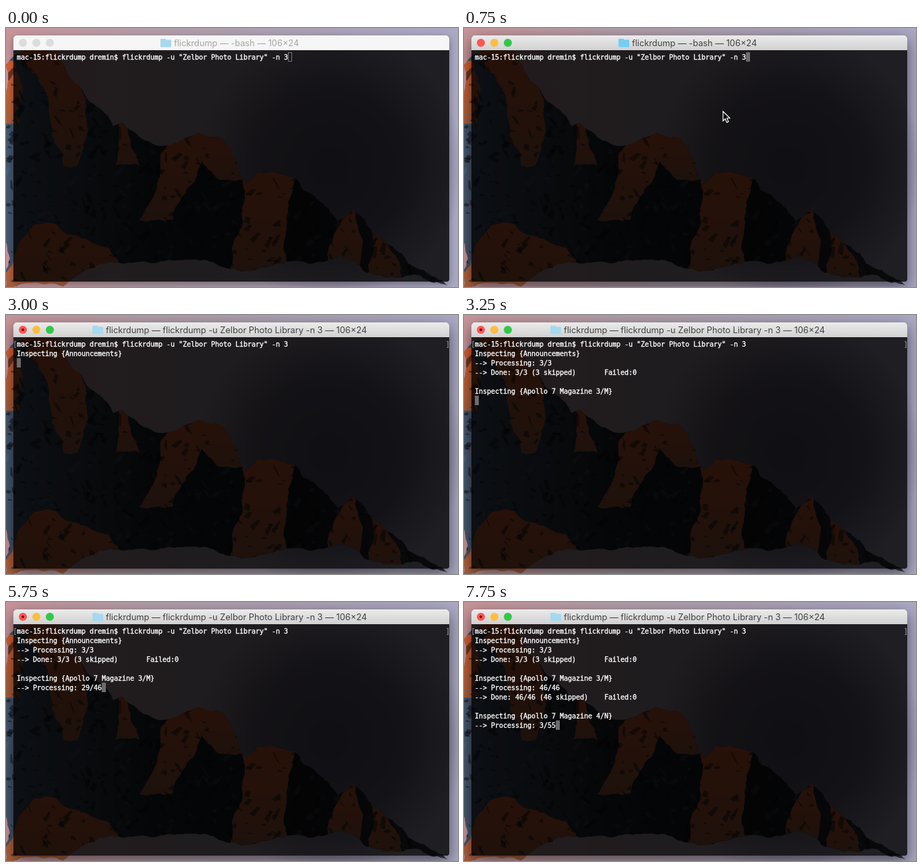
Recreate the animation shown at these times as an HTML page with a canvas. Size 670x385 px, loop 8000 ms.

```html
<!DOCTYPE html>
<html lang="en">
<head>
<meta charset="utf-8">
<title>Terminal</title>
<style>
html, body { margin: 0; width: 100%; height: 100%; overflow: hidden; }
canvas { display: block; }
</style>
</head>
<body>
<canvas id="stage" width="670" height="385"></canvas>
<script>
const W = 670, H = 385, LOOP = 8000;
const WIN = { x: 11, y: 11, w: 646, h: 366, bar: 22 };
const CELL = 6, ROW = 14, LEFT = 16, TOP = 36;
const MONO = '9.97px "DejaVu Sans Mono", monospace';
const GALLERY = 'Zelbor Photo Library';
const COMMAND = `mac-15:flickrdump dremin$ flickrdump -u "${GALLERY}" -n 3`;
const ctx = document.getElementById('stage').getContext('2d');

function trace(c, points) {
  c.beginPath();
  for (const [x, y] of points) c.lineTo(x, y);
  c.closePath();
}

function fillBox(color, x, y, w, h, radius = 0) {
  ctx.fillStyle = color;
  ctx.beginPath();
  ctx.roundRect(x, y, w, h, radius);
  ctx.fill();
}

function dot(color, x, y, r) {
  ctx.fillStyle = color;
  ctx.beginPath();
  ctx.arc(x, y, r, 0, 7);
  ctx.fill();
}

function gradient(g, ...colors) {
  colors.forEach((color, i) => g.addColorStop(i / (colors.length - 1), color));
  return g;
}

function seeded(seed) {
  return () => (seed = seed * 16807 % 2147483647) / 2147483647;
}

function paintBackdrop() {
  const canvas = document.createElement('canvas');
  canvas.width = W;
  canvas.height = H;
  const c = canvas.getContext('2d');
  const rnd = seeded(71);

  // Rough edge by midpoint displacement
  function edge(a, b) {
    const dx = b[0] - a[0], dy = b[1] - a[1];
    if (Math.hypot(dx, dy) < 7) return [a];
    const k = (rnd() - .5) * .22;
    const mid = [a[0] + dx / 2 - dy * k, a[1] + dy / 2 + dx * k];
    return [...edge(a, mid), ...edge(mid, b)];
  }
  const rough = keys => keys.flatMap((p, i) => edge(p, keys[(i + 1) % keys.length]));

  function face(x0, y0, w0, x1, y1, w1) {
    trace(c, rough([[x0 - w0 / 2, y0], [x0 + w0 / 2, y0], [x1 + w1 / 2, y1], [x1 - w1 / 2, y1]]));
    c.fillStyle = gradient(c.createLinearGradient(0, y0, 0, y1), '#d9602f', '#a5603f');
    c.fill();
  }

  function streaks(count, color) {
    c.fillStyle = color;
    for (let i = 0; i < count; i++) {
      const x = rnd() * W, y = 30 + rnd() * H;
      const len = 3 + 18 * rnd() ** 2, wide = 2 + rnd() * 5, lean = rnd() * 1.6 - .9;
      trace(c, [[x, y], [x + wide, y + 2], [x + len * lean + wide, y + len], [x + len * lean - 2, y + len * .7]]);
      c.fill();
    }
  }

  c.fillStyle = gradient(c.createLinearGradient(0, 0, W, 0), '#c79499', '#b09da8', '#aaa0b4', '#aaa8c4');
  c.fillRect(0, 0, W, H);
  c.fillStyle = gradient(c.createRadialGradient(480, 205, 20, 480, 205, 200),
    'rgba(70,66,88,.8)', 'rgba(70,66,88,.65)', 'rgba(70,66,88,0)');
  c.fillRect(0, 0, W, H);

  trace(c, rough([[0, 55], [34, 30], [76, 36], [141, 121], [159, 146], [172, 141], [236, 175],
    [287, 156], [320, 164], [355, 231], [373, 214], [427, 222], [492, 287], [512, 270],
    [545, 305], [655, 383], [0, 385]]));
  c.fillStyle = gradient(c.createLinearGradient(0, 0, W, 0), '#46586f', '#1b2028', '#14171c', '#343846');
  c.fill();
  c.clip();

  streaks(260, 'rgba(95,118,148,.22)');
  face(62, 30, 92, 95, 205, 20);
  face(4, 50, 20, 4, 145, 28);
  face(173, 141, 14, 180, 205, 36);
  face(275, 158, 60, 222, 285, 50);
  face(300, 156, 56, 335, 225, 40);
  face(395, 214, 84, 375, 365, 90);
  face(512, 270, 12, 500, 362, 50);
  face(550, 300, 18, 562, 372, 50);
  face(60, 292, 30, 95, 390, 230);
  streaks(750, 'rgba(12,13,18,.5)');
  return canvas;
}

const backdrop = paintBackdrop();

function mono(text, row, x = LEFT, color = '#fff') {
  ctx.font = MONO;
  ctx.fillStyle = ctx.strokeStyle = color;
  ctx.lineWidth = .35;
  const y = TOP + ROW * row + 11;
  ctx.fillText(text, x, y);
  ctx.strokeText(text, x, y);
}

function drawWindow(active, running) {
  const { x, y, w, h, bar } = WIN;
  ctx.save();
  // The shadow falls only outside the window
  ctx.beginPath();
  ctx.rect(0, 0, W, H);
  ctx.roundRect(x, y, w, h, 5);
  ctx.clip('evenodd');
  ctx.shadowColor = `rgba(0,0,0,${active ? .55 : .35})`;
  ctx.shadowBlur = active ? 22 : 12;
  ctx.shadowOffsetY = active ? 8 : 4;
  fillBox('#000', x, y, w, h, 5);
  ctx.restore();

  fillBox('rgba(0,0,0,.82)', x, y + bar, w, h - bar, [0, 0, 4, 4]);
  const face = active
    ? gradient(ctx.createLinearGradient(0, y, 0, y + bar), '#ebebeb', '#d1d1d1')
    : '#f6f6f6';
  fillBox(face, x, y, w, bar, [5, 5, 0, 0]);

  const lights = active ? ['#fc5652', '#fdbd3f', '#33c748'] : Array(3).fill('#dcdcdc');
  lights.forEach((color, i) => dot(color, 25 + 20 * i, 22, 6));
  if (running) dot('#7e0508', 25, 22, 2);

  const left = running ? 148 : 249;
  const folder = active && !running ? '#74cdf3' : '#a6d9ee';
  fillBox(folder, left - 20, 16, 8, 4, 1);
  fillBox(folder, left - 20, 17.5, 16, 11, 1);
  ctx.font = '12.8px Inter, sans-serif';
  ctx.fillStyle = active ? '#404040' : '#a4a4a4';
  const job = running ? `flickrdump -u ${GALLERY} -n 3` : '-bash';
  ctx.fillText(`flickrdump — ${job} — 106×24`, left, 27);
}

function screenLines(t) {
  const lines = [COMMAND];
  if (t < 1500) return lines;
  if (t >= 3000) lines.push('Inspecting {Announcements}');
  if (t >= 3250) {
    lines.push('--> Processing: 3/3', '--> Done: 3/3 (3 skipped)       Failed:0', '',
      'Inspecting {Apollo 7 Magazine 3/M}');
  }
  if (t >= 7000) {
    lines.push('--> Processing: 46/46', '--> Done: 46/46 (46 skipped)    Failed:0', '',
      'Inspecting {Apollo 7 Magazine 4/N}');
  }
  if (t >= 7500) {
    lines.push(`--> Processing: ${t < 7750 ? 1 : 3}/55`);
  } else if (t >= 3750 && t < 7000) {
    const tick = Math.floor((t - 3750) / 250);
    lines.push(`--> Processing: ${Math.round(2.1 + 3.41 * tick)}/46`);
  } else {
    lines.push('');
  }
  return lines;
}

function drawCaret(col, row, active) {
  const x = LEFT + CELL * col, y = TOP + ROW * row;
  if (active) return fillBox('#6c6c6c', x, y, CELL, ROW);
  ctx.strokeStyle = '#777';
  ctx.lineWidth = 1;
  ctx.strokeRect(x + .5, y + .5, CELL - 1, ROW - 1);
}

function drawPointer() {
  ctx.save();
  ctx.translate(384, 124);
  trace(ctx, [[0, 0], [0, 14], [3.2, 11], [5.6, 16.4], [8, 15.3], [5.7, 10], [10, 10]]);
  ctx.fillStyle = '#000';
  ctx.strokeStyle = '#fff';
  ctx.lineWidth = 1.2;
  ctx.fill();
  ctx.stroke();
  ctx.restore();
}

function draw(now) {
  const t = now % LOOP;
  const active = t >= 750, running = t >= 1500;
  ctx.drawImage(backdrop, 0, 0);
  drawWindow(active, running);

  const lines = screenLines(t);
  const last = lines.length - 1;
  drawCaret(lines[last].length, last, active);
  lines.forEach((line, row) => mono(line, row));
  if (running) {
    mono('[', 0, 10.5, '#8a8a8a');
    mono(']', 0, 652, '#8a8a8a');
  }
  if (t >= 500 && t < 1750) drawPointer();
  requestAnimationFrame(draw);
}

requestAnimationFrame(draw);
</script>
</body>
</html>
```
